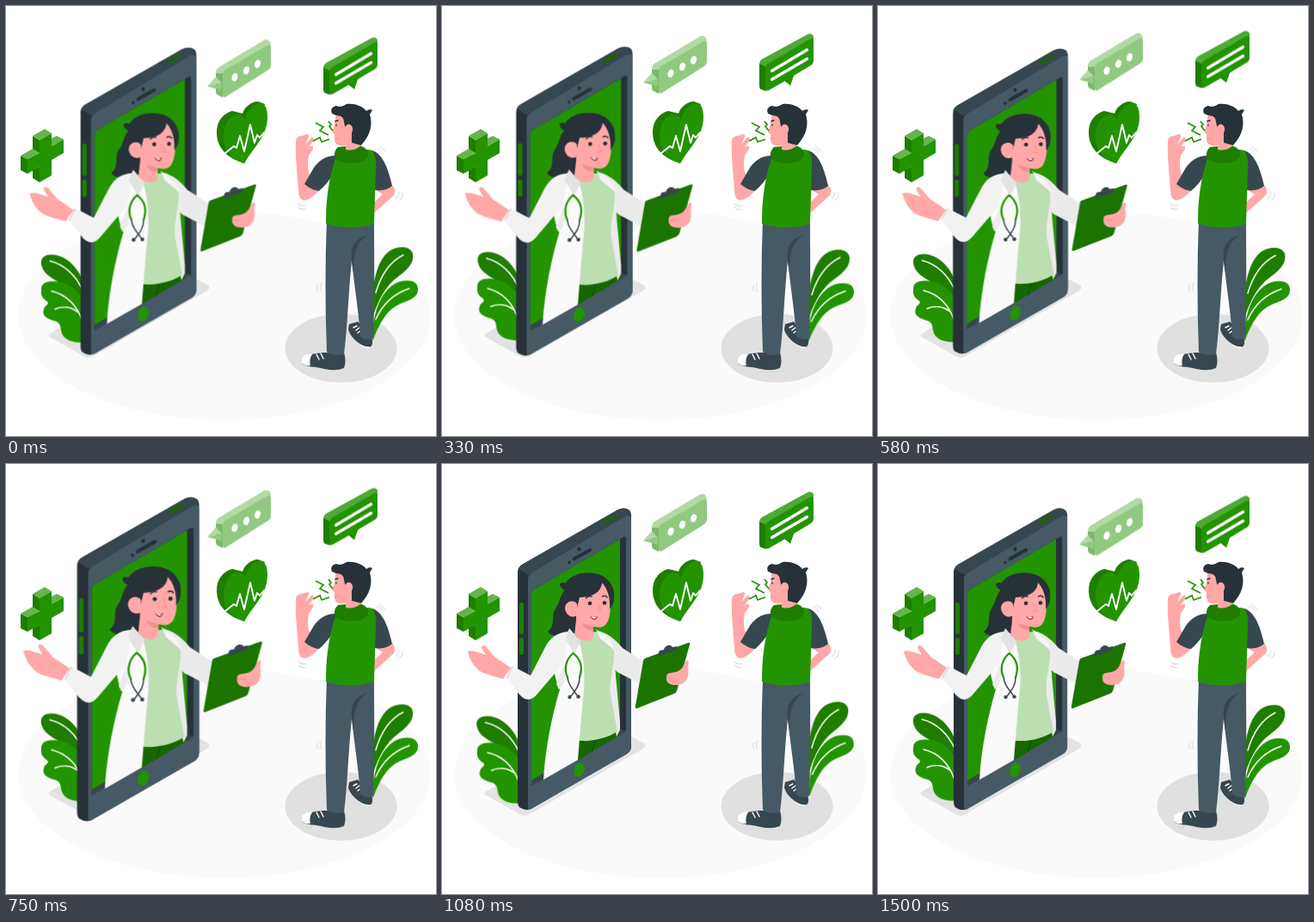
An HTML page for the animation above (1540 ms loop, 500x500 px).

```html
<!DOCTYPE html>
<html lang="en">
<head>
<meta charset="utf-8">
<title>Online doctor visit</title>
<style>
html, body { margin: 0; width: 100%; height: 100%; overflow: hidden; background: #fff; }
svg { display: block; width: 100vw; height: 100vh; }
.beat, .float, .wind { animation: 1.54s linear infinite; }
.beat { animation-name: beat; transform-origin: 159px 227px; }
.float { animation-name: float; }
.wind { animation-name: wind; transform-origin: 260px 335px; }
@keyframes beat {
  0% { transform: scale(1.019); }
  14.35% { transform: scale(1.1); }
  23.9%, 35.6% { transform: scale(1); }
  53.1% { transform: scale(1.1); }
  62.7%, 97.4% { transform: scale(1); }
  100% { transform: scale(1.019); }
}
@keyframes float {
  0%, 100% { transform: translateY(-.7px); }
  45.5% { transform: translateY(-10px); }
  95% { transform: translateY(0); }
}
@keyframes wind {
  0%, 100% { transform: rotate(.13deg); }
  21.1% { transform: rotate(1deg); }
  69.8% { transform: rotate(-1deg); }
}
.green { fill: #239400; }
.mid { fill: #1f7d00; }
.deep { fill: #186600; }
.lite { fill: #4fa936; }
.pale { fill: #65b44d; }
.ink { fill: #263238; }
.slate { fill: #37474f; }
.steel { fill: #455a64; }
.skin { fill: #ffa8a7; }
.line { fill: none; stroke: #fff; stroke-width: 1.4; stroke-linecap: round; stroke-linejoin: round; }
.bolt { fill: none; stroke: #239400; stroke-width: 1.7; }
.shake { fill: none; stroke: #e0e0e0; stroke-width: 1.2; stroke-linecap: round; }
</style>
</head>
<body>
<svg viewBox="0 0 500 500">
  <!-- floor and shadows -->
  <ellipse cx="254" cy="360" rx="239.5" ry="121.500" fill="#fafafa"/>
  <path fill="#e3e3e3" d="M51 381L120 340L220 317L234 324Q239 327 234 331L102 407Q96 411 90 407L51 385Q48 383 51 381Z"/>
  <ellipse cx="389.5" cy="398" rx="65" ry="40" fill="#e0e0e0"/>

  <!-- plants -->
  <g class="wind">
    <path class="mid" d="M41 301C39 292 48 288 58 290C75 294 87 309 92 328V346C82 330 72 327 62 322C51 316 43 311 41 301Z"/>
    <path class="green" d="M41 330C41 320 53 319 66 322C79 326 86 335 94 346V391C84 393 71 391 66 383C62 376 66 371 58 367C49 365 41 361 44 353C45 348 51 348 48 344C43 341 40 337 41 330Z"/>
    <path class="line" d="M51 297C68 301 82 314 90 333M53 332C70 336 82 347 89 367M57 353C66 349 76 350 83 356"/>
    <path class="mid" d="M425 352C426 322 431 296 445 285C455 278 471 278 473 288C475 300 464 308 455 315C443 324 434 338 427 360Z"/>
    <path class="green" d="M426 388C426 360 434 331 455 321C466 317 479 318 479 329C479 339 468 342 458 346C445 352 436 364 427 388Z"/>
    <path class="line" d="M462 289C446 297 436 312 430 333M469 328C451 334 438 346 430 364"/>
  </g>

  <!-- medical cross -->
  <path class="mid" d="M39 156L31 151V167L39 171ZM25 178L17 174V191L25 195ZM39 187L31 191V200L39 205Z"/>
  <path class="pale" d="M39 156L31 151L45 143L53 148ZM25 178L17 174L31 166L39 171ZM53 163V154L59 151L67 155Z"/>
  <path class="green" d="M39 156L53 148V163L67 155V171L53 179V197L39 205V187L25 195V178L39 171Z"/>

  <!-- heart -->
  <path class="mid" d="M277 183L269 180C255 174 245 163 245 147C245 133 253 125 263 122L275 125C277 118 285 111 293 111L301 114L290 160Z"/>
  <path class="green" d="M277 183C263 178 253 168 253 152C253 137 261 127 269 126C274 126 276 129 278 132C281 121 289 113 296 113C302 114 304 120 304 129C304 151 289 163 277 183Z"/>
  <path class="line" style="stroke-width:1.9" d="M255 171L265 163L268 165L272 151L277 169L284 138L289 159L292 150L295 153L300 147"/>

  <!-- phone and doctor -->
  <g class="beat">
    <path class="ink" d="M88 126Q88 120 93 117L204 53.500Q212 49.500 218 54Q220 56 220 61V328Q220 334 215 337L103 401Q97 404 90 399Q88 397 88 392Z"/>
    <path class="slate" d="M89 122Q90 119 93 117L204 53.500Q212 49.500 218 54L219 58L105 126L100 129Z"/>
    <path class="steel" d="M100 134Q100 129 105 126L213 61Q220 57 220 65V328Q220 334 215 337L104 401Q100 403 100 398Z"/>
    <path d="M187 67L200 59.500Q204 58 204 61L191 69Q186 71 187 67Z" class="deep"/>
    <rect class="mid" x="90" y="161" width="5" height="37" rx="2.500"/>
    <rect class="mid" x="90" y="202" width="5" height="20" rx="2.500"/>
    <path class="ink" d="M104 151Q104 148 107 146L211 85Q214 83 214 87V310L104 374Z"/>
    <path class="green" d="M104 151Q104 148 107 146L207 87.500V308L104 368Z"/>
    <path class="slate" d="M104 368L207 308L214 311L104 374Z"/>
    <path d="M153.500 110.500L172 100" stroke="#263238" stroke-width="4" stroke-linecap="round"/>
    <ellipse class="ink" cx="159.500" cy="99" rx="2" ry="2.400"/>
    <ellipse class="ink" cx="148" cy="114.500" rx="1.600" ry="2"/>
    <ellipse class="green" cx="159.500" cy="355.500" rx="6" ry="8.500" transform="rotate(18 159.500 355.500)"/>

    <!-- hair behind -->
    <path class="ink" d="M146 143C136 152 138 160 132 168C126 177 133 187 123 195C128 202 142 202 150 198L156 205H172V160Z"/>

    <!-- trousers, coat, shirt -->
    <path class="deep" d="M156 318L205 305L207 315L157 345Z"/>
    <path d="M178 322L174 335" stroke="#114d00" fill="none"/>
    <path fill="#ebebeb" d="M181 194C193 201 200 211 201 225L202 246L207 300V309L203 317L194 270Z"/>
    <path fill="#ebebeb" d="M182 194C196 198 204 207 210 214L241 234L233 257L204 242L194 232Z"/>
    <path fill="#bcdfb2" d="M157 198L180 195C193 201 201 211 200 223C199 239 194 253 196 269L204 311C192 319 172 324 156 321Z"/>
    <path fill="#fafafa" d="M147 194L157 199C163 214 167 238 165 262C162 292 160 320 158 344L118 367C120 331 128 292 137 262C128 246 126 215 147 194Z"/>
    <path fill="#ebebeb" d="M136 262C144 256 145 242 142 232L133 256Z"/>
    <path fill="#f2f2f2" d="M147 195C133 196 126 202 120 213L103 246L82 235L75 249L90 268C98 277 105 275 112 266L141 232Z"/>
    <path d="M82 235L75 249" stroke="#dedede" stroke-width="2"/>
    <path fill="#e3e3e3" d="M148 191L161 206L154 221L143 203Z"/>
    <path fill="#f5f5f5" d="M179 192L184 203L201 217L196 205Z"/>

    <!-- head -->
    <path class="skin" d="M156 155L186 135L196 150C197 180 193 190 182 190L176 189V201C172 208 162 207 154 199L156 181Z"/>
    <path fill="#f28f8f" d="M176 189L163 185C165 191 170 194 176 193Z"/>
    <path class="ink" d="M137 140C139 136 143 139 144 138C149 130 162 125 176 127C193 129 202 143 200 156C200 162 197 166 195 169C196 155 192 144 186 138C185 150 173 155 160 155L157 167L151 171C145 160 144 151 145 147C141 147 138 144 137 140Z"/>
    <path class="skin" d="M157 163C154 157 143 159 143 168C144 176 151 180 157 176Z"/>
    <circle class="ink" cx="172" cy="162" r="2.300"/>
    <circle class="ink" cx="189" cy="161.500" r="2.300"/>
    <path d="M167.500 156Q170 153 174 154M186.500 154Q190 152 192 155" fill="none" stroke="#263238" stroke-width="1.500" stroke-linecap="round"/>
    <path d="M182 163L184.500 171L180 171" fill="none" stroke="#f28f8f" stroke-width="1"/>
    <path fill="#8f3946" d="M172 177Q177 179 181 177Q180 182 176 181Q173 179 172 177Z"/>
    <path fill="#fff" d="M173 177.500L180 178.500L177 180Z"/>

    <!-- stethoscope -->
    <path d="M152.500 220C143 228 142 240 146 248M152.500 220C163 228 163 239 160 248" fill="none" stroke="#239400" stroke-width="2.200" stroke-linecap="round"/>
    <path d="M146 248C147 259 154 263 157 269M160 248C160 259 154 264 150 270" fill="none" stroke="#37474f" stroke-width="1.500"/>
    <circle class="slate" cx="148.500" cy="271" r="2.200"/>
    <circle class="slate" cx="158.500" cy="270.500" r="2.200"/>

    <!-- hands and clipboard -->
    <path class="skin" d="M30 218Q34 216 42 219L51 222L46 214Q46 209 51 212L62 225C69 229 74 233 80 237L71 250C61 247 52 245 46 242C38 237 32 228 30 218Z"/>
    <path fill="#1c7400" d="M236 226L286 208Q289 207 288 210L273 264Q272 266 270 267L227 284Q224 285 225 281L234 229Q234 227 236 226Z"/>
    <path class="slate" d="M250 224L253 217L258 216C259 211 266 209 268 213L273 212L272 217Z"/>
    <path class="skin" d="M261 246C263 241 270 244 276 240C281 237 282 230 285 228Q288 228 286 235C287 244 287 251 280 255C272 259 261 257 261 250Z"/>
    <path d="M262 248L271 249" stroke="#f28f8f" stroke-width=".8"/>
  </g>

  <!-- pale speech bubble -->
  <g class="float">
    <path fill="#7db86b" d="M244 79L252 79V107L246 104Q244 103 244 100Z"/>
    <path fill="#b1d9a4" d="M244 79Q244 74 247 72L299 41Q304 38 307 42L308 46L253 79ZM234 94L244 83L251 90Z"/>
    <path fill="#91c980" d="M252 80Q252 77 255 75L303 47Q308 44 308 49V70Q308 73 305 75L256 106Q252 108 252 104ZM234 94L251 90V99Z"/>
    <g fill="#fff">
      <ellipse cx="266" cy="83.500" rx="3.300" ry="4.800" transform="rotate(20 266 83.500)"/>
      <ellipse cx="279.500" cy="75.500" rx="3.300" ry="4.800" transform="rotate(20 279.500 75.500)"/>
      <ellipse cx="292.500" cy="68" rx="3.300" ry="4.800" transform="rotate(20 292.500 68)"/>
    </g>
  </g>

  <!-- green speech bubble -->
  <g class="float">
    <path class="mid" d="M369 72L377 74V104L371 102Q369 101 369 98ZM397 91L405 97.500L409 85Z"/>
    <path class="lite" d="M369 72Q369 69 372 67L425 38Q430 36 432 40V45L377 76Z"/>
    <path class="green" d="M376 77Q376 74 379 72L427 44Q432 41 432 46V69Q432 72 429 74L409 86L405 97.500L401 91L380 103Q376 105 376 100Z"/>
    <path class="line" style="stroke-width:3.400" d="M383.500 80.500L424.500 56M383.500 90.500L424.500 66.500"/>
  </g>

  <!-- patient -->
  <g>
    <path class="slate" d="M399 370L409 367L425 385Q428 394 423 397C412 396 400 385 398 376Z"/>
    <path fill="#fff" d="M412 394Q419 397 424 396L422 398Q414 397 409 392Z"/>
    <path class="line" d="M404 374L408 372M407 377L411 374M409 380L413 377"/>
    <path class="slate" d="M345 409C351 405 360 404 368 403H393Q396 413 393 421Q384 425 370 422C359 419 349 420 345 416Z"/>
    <path fill="#fff" d="M344 410C346 405 352 404 356 405Q352 411 354 418Q346 419 344 414Z"/>
    <path class="line" d="M361 405L364 411M366 404L369 410"/>
    <path class="steel" d="M373 248L428 250C428 295 429 342 427 386Q419 390 412 384C410 355 405 325 402 296C398 335 397 375 393 405Q381 408 373 402C371 350 371 299 373 248Z"/>
    <path class="slate" d="M402 296C400 279 406 271 420 266C409 275 404 283 404 310Z"/>
    <path class="skin" d="M428 213L449 208Q454 214 451 220L429 240L427 229L438 219Z"/>
    <path class="slate" d="M426 168C440 173 445 193 449 209Q442 216 428 214Z"/>
    <path class="skin" d="M337 158Q337 151 344 151L350 149Q354 149 351 154L348 161L355 153Q359 152 357 157L352 164Q358 160 357 166L352 174Q350 183 352 194L367 211Q356 225 347 226Q340 225 340 214C339 196 336 175 337 158Z"/>
    <path class="slate" d="M386 174C373 173 364 179 358 188L347 207Q355 214 364 215C373 207 381 197 384 186Z"/>
    <path class="green" d="M383 177C388 170 416 165 426 168Q431 174 430 190L428 253Q402 262 372 253C372 230 374 205 383 177Z"/>
    <path class="mid" d="M386 164C380 170 380 178 389 181C401 185 418 182 421 174C422 167 416 162 407 162Z"/>
    <path class="skin" d="M384 122L382 138L379 147L382 149V156Q383 164 395 162V167Q404 169 412 163L414 133Z"/>
    <path class="ink" d="M379 125Q376 118 384 116C388 118 391 117 396 114C405 113 414 116 419 122Q423 119 426 121L423 126C427 139 423 151 413 162L402 159V146L395 144L393 135Q393 130 389 128Q384 128 379 125Z"/>
    <ellipse class="skin" cx="398" cy="144" rx="5" ry="6.500" transform="rotate(15 398 144)"/>
    <path class="line" style="stroke:#263238" d="M383 134L386 133M384 138V139"/>
    <path d="M382 154L387 154" stroke="#f28f8f"/>
  </g>

  <!-- pain marks -->
  <path class="bolt" d="M360 136L369 140.500L365 145L375 150M357 157L365 153L367 158L376 155M375 134L378 138L376 140L380 145"/>
  <path class="shake" d="M431 166Q436 166 438 172M434 164Q440 165 440 169M453 224Q457 222 457 216M457 226Q462 223 461 217M340 230Q344 234 350 232M340 234Q344 238 349 236M367 322Q364 327 367 332M363 324Q360 328 363 331"/>
</svg>
</body>
</html>
```
